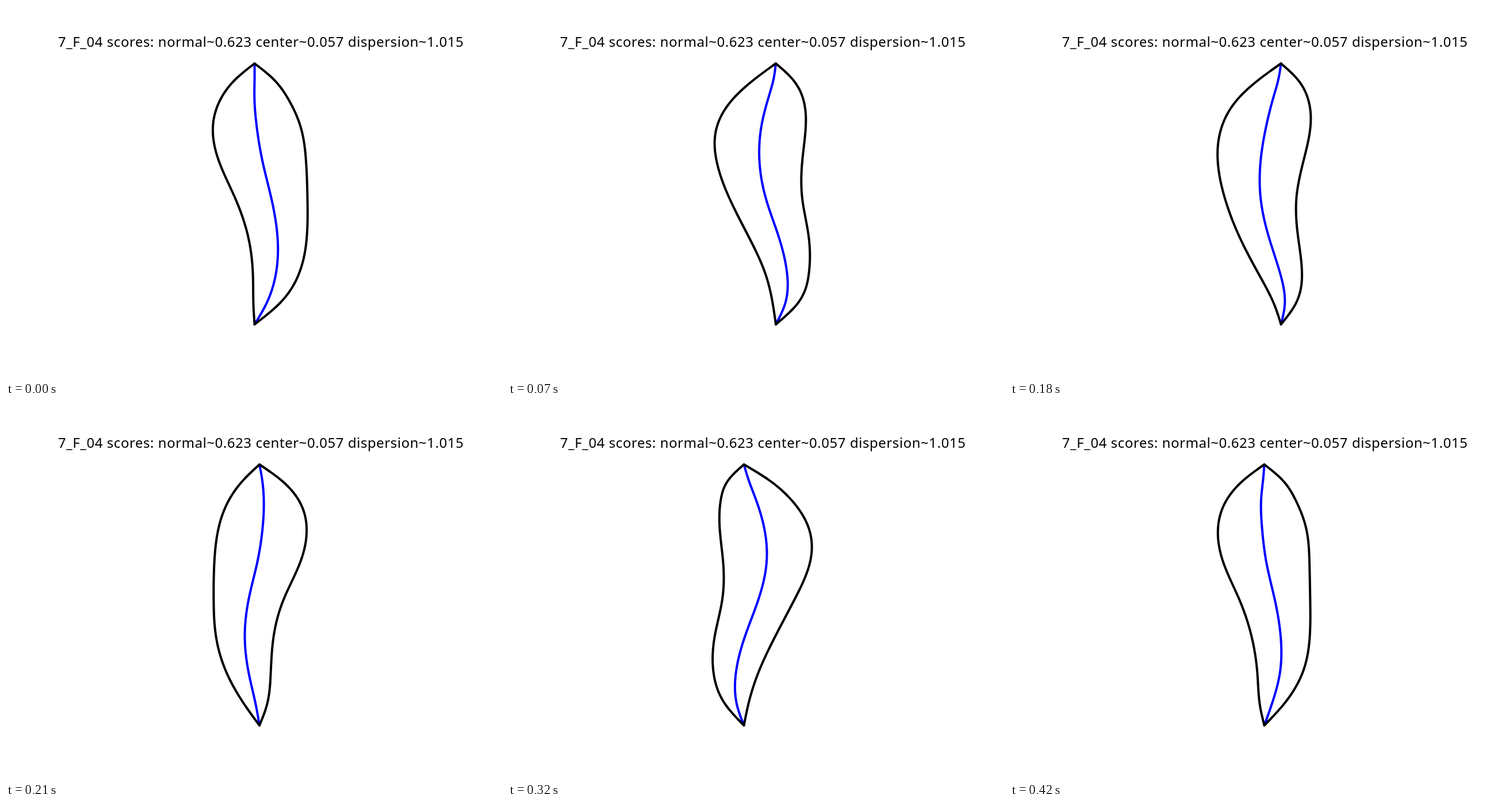
These frames come from a looping animation (863x649 px, 0.49 s). An HTML page:

```html
<!DOCTYPE html>
<html lang="en">
<meta charset="utf-8">
<title>Leaf shape</title>
<style>
  html, body { margin: 0; height: 100%; overflow: hidden; background: #fff; }
  svg { display: block; }
  text { font: 24px "Noto Sans", "Open Sans", sans-serif; letter-spacing: .55px; }
  path { fill: none; stroke-width: 4; stroke-linejoin: round; stroke-linecap: round; }
</style>
<svg width="863" height="649">
  <text x="90.5" y="71">7_F_04 scores: normal~0.623 center~0.057 dispersion~1.015</text>
  <path id="mid" stroke="#00f"/>
  <path id="edge" stroke="#000"/>
</svg>
<script>
const STEP = 70;
const knots = [100, 125, 160, 210, 270, 335, 400, 465, 520, 554];

// Each pose: x of both tips, then x of the left and right edges at the inner knots
const poses = [
  [432.5, [402, 374.5, 360, 370.5, 399, 421, 429.5, 430.5], [463, 490, 512.5, 522, 524.5, 523.5, 510, 473.5]],
  [466, [432, 393, 363.5, 363, 385.5, 418, 447.5, 461], [493, 513, 518, 512, 512, 523, 523.5, 502]],
  [471.5, [437, 398, 368.5, 361.5, 374, 398.5, 432, 460], [498, 518, 522.7, 510.5, 498.3, 501, 508, 496]],
  [441, [415, 389, 370, 362.5, 361.3, 365.5, 385, 416.5], [476, 508, 523, 512, 483, 465.5, 460.5, 453.5]],
  [410.5, [385, 370.5, 368.3, 374.3, 372.8, 359.5, 358, 380], [451, 491.5, 523, 525.5, 498.5, 464.5, 434.5, 417.5]],
  [405, [377, 361, 360.3, 376, 391, 389, 380, 385.5], [442, 482, 516, 526.8, 516, 492, 456, 422.5]],
  [442.5, [409, 378, 362, 371, 399, 420.5, 430.5, 435], [472, 496, 515, 521, 522.3, 521.5, 508, 474]]
];

// Natural cubic spline through (knots[i], x[i])
function spline(x) {
  const n = x.length, h = i => knots[i + 1] - knots[i];
  const slope = i => (x[i + 1] - x[i]) / h(i);
  const u = [0], v = [0], m = Array(n).fill(0);
  for (let i = 1; i < n - 1; i++) {
    const d = 2 * (h(i - 1) + h(i)) - h(i - 1) * u[i - 1];
    u[i] = h(i) / d;
    v[i] = (6 * (slope(i) - slope(i - 1)) - h(i - 1) * v[i - 1]) / d;
  }
  for (let i = n - 2; i > 0; i--) m[i] = v[i] - u[i] * m[i + 1];
  return y => {
    let i = 0;
    while (i < n - 2 && y > knots[i + 1]) i++;
    const w = h(i), b = (y - knots[i]) / w, a = 1 - b;
    return a * x[i] + b * x[i + 1] + ((a ** 3 - a) * m[i] + (b ** 3 - b) * m[i + 1]) * w * w / 6;
  };
}

const ys = [];
for (let y = knots[0]; y <= knots.at(-1); y += 2) ys.push(y);
const points = f => ys.map(y => f(y).toFixed(2) + ' ' + y);

const frames = poses.map(([tip, l, r]) => {
  const left = spline([tip, ...l, tip]), right = spline([tip, ...r, tip]);
  return {
    mid: 'M' + points(y => (left(y) + right(y)) / 2).join('L'),
    edge: 'M' + [...points(left), ...points(right).reverse()].join('L') + 'Z'
  };
});

const mid = document.getElementById('mid'), edge = document.getElementById('edge');
const start = performance.now();
function draw() {
  const frame = frames[Math.floor((performance.now() - start) / STEP) % frames.length];
  mid.setAttribute('d', frame.mid);
  edge.setAttribute('d', frame.edge);
  requestAnimationFrame(draw);
}
draw();
</script>
</html>
```
